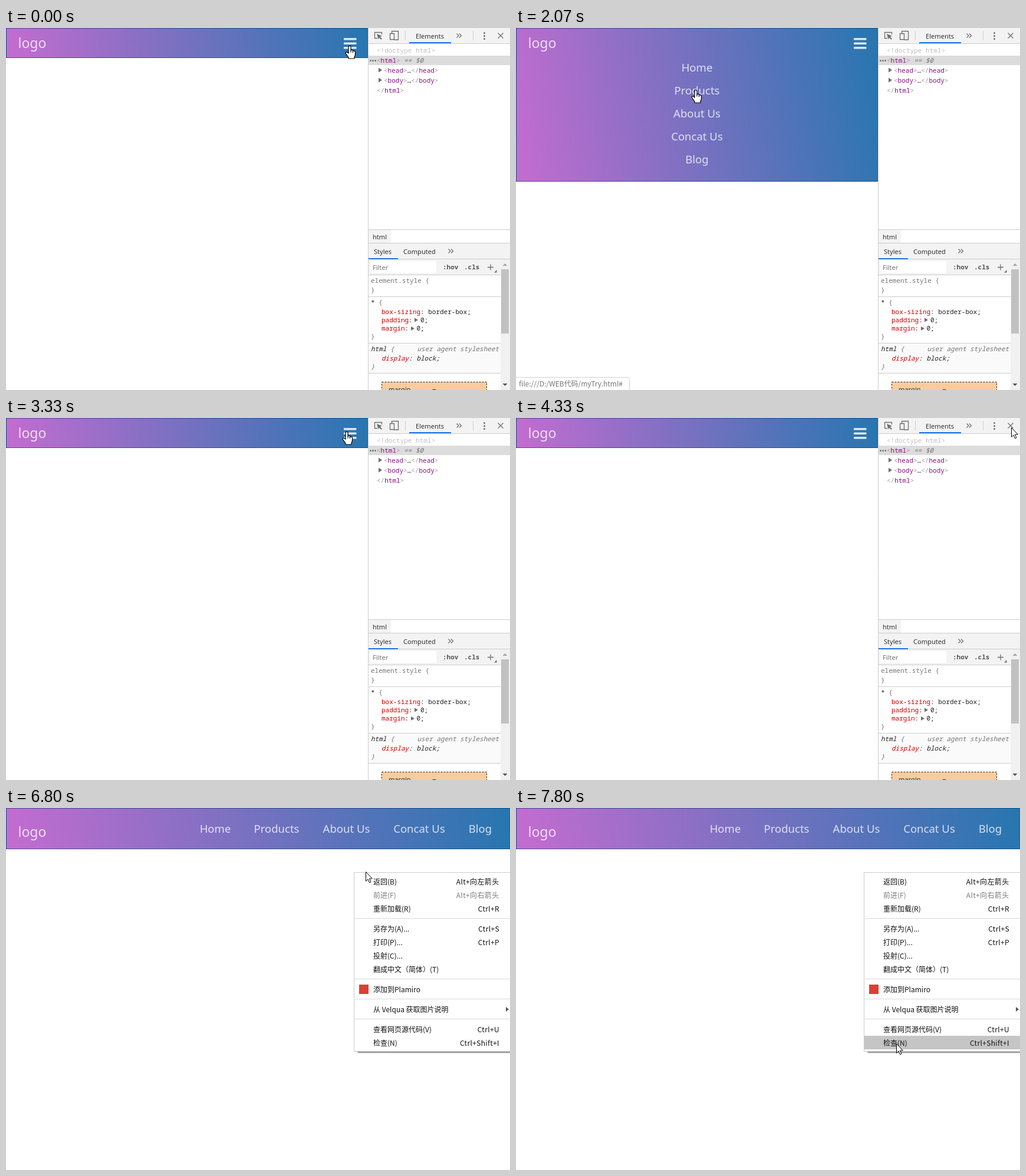
Animation, 855 px wide and 615 px high, one loop 8 s. Source, as an HTML page:

```html
<!DOCTYPE html>
<html lang="en">
<head>
<meta charset="utf-8">
<title>Responsive navbar</title>
<style>
html, body { margin: 0; width: 100%; height: 100%; overflow: hidden; background: #fff; }
svg { position: absolute; left: 0; top: 0; }

/* Every timeline shares one 8 s clock, divided into 120 ticks */
.anim { animation: 8s step-end -10ms infinite; }

#bar {
  position: absolute; left: 0; top: 0; box-sizing: border-box;
  border: 1px solid rgba(6, 52, 106, .6);
  background: linear-gradient(80deg, #c46cd0, #2676b0);
  animation-name: bar;
}
#narrow { animation-name: narrow; }
#links { animation-name: links; }
#wide { animation-name: wide; }
#tools { animation-name: tools; }
#status { animation-name: status; }
#menu { animation-name: menu; }
#hoverView { animation-name: hover-view; }
#hoverInspect { animation-name: hover-inspect; }
#hand { animation-name: hand; }
#arrow { animation-name: arrow; }
#pointer { animation: move 8s -10ms infinite; }

@keyframes bar {
  0% { width: 614px; height: 51px; }
  3.33% { width: 614px; height: 261px; }
  41.67% { width: 614px; height: 51px; }
  64.17%, 100% { width: 855px; height: 70px; }
}
@keyframes narrow { 0% { opacity: 1; } 64.17%, 100% { opacity: 0; } }
@keyframes links { 0% { opacity: 0; } 3.33% { opacity: 1; } 41.67%, 100% { opacity: 0; } }
@keyframes wide { 0% { opacity: 0; } 64.17%, 100% { opacity: 1; } }
@keyframes tools { 0% { opacity: 1; } 63.33%, 100% { opacity: 0; } }
@keyframes status {
  0% { opacity: 0; } 20.83% { opacity: .5; } 21.67% { opacity: 1; }
  32.5% { opacity: .5; } 33.33%, 100% { opacity: 0; }
}
@keyframes menu { 0% { opacity: 0; } 85%, 100% { opacity: 1; } }
@keyframes hover-view { 0% { opacity: 0; } 95% { opacity: 1; } 96.67%, 100% { opacity: 0; } }
@keyframes hover-inspect { 0% { opacity: 0; } 96.67%, 100% { opacity: 1; } }
@keyframes hand {
  0%, 14.17%, 19.17%, 36.67% { opacity: 1; }
  10.83%, 16.67%, 31.67%, 45.83%, 100% { opacity: 0; }
}
@keyframes arrow {
  0%, 14.17%, 19.17%, 36.67% { opacity: 0; }
  10.83%, 16.67%, 31.67%, 45.83%, 100% { opacity: 1; }
}
@keyframes move {
  0% { transform: translate(583px, 30px); }
  9.17% { transform: translate(583px, 30px); animation-timing-function: steps(3); }
  11.67% { transform: translate(552px, 33px); }
  12.5% { transform: translate(552px, 33px); animation-timing-function: steps(3); }
  15% { transform: translate(582px, 30px); }
  15.83% { transform: translate(582px, 30px); animation-timing-function: steps(2); }
  17.5% { transform: translate(440px, 48px); animation-timing-function: steps(2); }
  19.17% { transform: translate(291px, 70px); }
  22.5% { transform: translate(291px, 70px); animation-timing-function: steps(4); }
  25.83% { transform: translate(305px, 105px); }
  29.17% { transform: translate(305px, 105px); animation-timing-function: steps(3); }
  31.67% { transform: translate(350px, 92px); animation-timing-function: steps(4); }
  35% { transform: translate(556px, 30px); animation-timing-function: steps(2); }
  36.67% { transform: translate(578px, 23px); }
  45% { transform: translate(578px, 23px); animation-timing-function: steps(3); }
  47.5% { transform: translate(640px, 14px); animation-timing-function: steps(4); }
  50.83% { transform: translate(820px, 8px); animation-timing-function: steps(4); }
  54.17% { transform: translate(840px, 16px); }
  67.5% { transform: translate(840px, 16px); animation-timing-function: steps(2); }
  69.17% { transform: translate(836px, 15px); animation-timing-function: steps(6); }
  74.17% { transform: translate(650px, 92px); animation-timing-function: steps(4); }
  77.5% { transform: translate(610px, 108px); }
  85.83% { transform: translate(610px, 108px); animation-timing-function: steps(3); }
  88.33% { transform: translate(545px, 160px); animation-timing-function: steps(4); }
  91.67% { transform: translate(503px, 280px); animation-timing-function: steps(4); }
  95% { transform: translate(600px, 374px); animation-timing-function: steps(3); }
  97.5%, 100% { transform: translate(645px, 400px); }
}

text { white-space: pre; }
.nav { font: 18.55px "Noto Sans", sans-serif; fill: rgba(255, 255, 255, .78); }
.nav text { text-anchor: middle; }
.nav .logo { font-size: 23px; text-anchor: start; }
.ui { font: 11.1px "Noto Sans", sans-serif; fill: #333; }
.code { font: 11px "Noto Sans Mono", monospace; fill: #222; }
.it { font-style: italic; }
.b { font-weight: bold; fill: #555; }
.tag { fill: #881280; }
.br { fill: #a894a6; }
.prop { fill: #c80000; }
.dim { fill: #757575; }
.line { stroke: #ccc; fill: none; }
.icon { stroke: #6e6e6e; fill: none; stroke-width: 1.3; }
.tri { fill: #6e6e6e; }
.items { font: 12px "Noto Sans CJK SC", "Noto Sans", sans-serif; fill: #111; }
.keys { text-anchor: end; letter-spacing: .35px; }
</style>
</head>
<body>
<div id="bar" class="anim"></div>
<svg width="855" height="615" viewBox="0 0 855 615">
  <g id="narrow" class="anim nav">
    <text class="logo" x="20.5" y="34">logo</text>
    <g fill="#fff" fill-opacity=".84">
      <rect x="573" y="17" width="21.5" height="3.5" rx=".7"/>
      <rect x="573" y="24.5" width="21.5" height="3.5" rx=".7"/>
      <rect x="573" y="32" width="21.5" height="3.5" rx=".7"/>
    </g>
    <g id="links" class="anim">
      <text x="307" y="74">Home</text>
      <text x="307" y="113">Products</text>
      <text x="307" y="152">About Us</text>
      <text x="307" y="191">Concat Us</text>
      <text x="307" y="230">Blog</text>
    </g>
  </g>

  <g id="wide" class="anim nav">
    <text class="logo" x="20.5" y="49">logo</text>
    <text x="355" y="42">Home</text>
    <text x="459" y="42">Products</text>
    <text x="577.5" y="42">About Us</text>
    <text x="701" y="42">Concat Us</text>
    <text x="804.5" y="42">Blog</text>
  </g>

  <g id="tools" class="anim">
    <rect x="614" width="241" height="615" fill="#fff"/>
    <path fill="#f3f3f3" d="M615 0h240v26H615zM615 343h38v22H615zM615 366h240v53H615z"/>
    <rect x="615" y="47" width="240" height="16" fill="#dcdcdc"/>
    <rect x="615" y="536" width="224" height="50" fill="#fafafa"/>
    <rect x="618" y="396" width="112" height="20" fill="#fff"/>
    <path class="line" d="M614.5 0V615M615 26.5H855M677.5 5V21M792.5 5V21M615 342.5H855M615 365.5H855M615 392.5H855M615 419.5H839M615 456.5H839M615 535.5H839M615 586.5H839"/>
    <path fill="#1a73e8" d="M684 24h71v2h-71zM615 391h50v2h-50z"/>

    <path class="icon" d="M630 17.5H625.5V7.5H637.500V11M651.500 9V19.500H658M654.500 9V5.500H665.500V20H658.500V9.500H651"/>
    <path class="tri" d="M629 10l9 3.500-3.300 1.500 3.300 3.300-1.600 1.500-3.200-3.300-1.400 3z"/>
    <path class="icon" d="M764.500 9.500l3.500 3.500-3.500 3.500M769 9.500l3.500 3.500-3.500 3.500M750.500 375.500l3.500 3.500-3.500 3.500M755 375.500l3.500 3.500-3.500 3.500M834.500 8.500l9 9M843.500 8.500l-9 9M817 406.500h10M822 401.500v10"/>
    <g class="tri">
      <circle cx="811.500" cy="8.500" r="1.500"/><circle cx="811.500" cy="13.500" r="1.500"/><circle cx="811.500" cy="18.500" r="1.500"/>
      <path d="M828 415.500h4.500V411z"/>
      <path d="M632 67.500l6 4-6 4zM632 84.500l6 4-6 4z"/>
      <path d="M693 492.500l6 3.500-6 3.500zM687 507l6 3.500-6 3.500z"/>
    </g>
    <g fill="#555"><circle cx="618.500" cy="55.500" r="1.200"/><circle cx="622.500" cy="55.500" r="1.200"/><circle cx="626.500" cy="55.500" r="1.200"/></g>

    <g class="ui">
      <text x="695" y="18">Elements</text>
      <text x="622" y="359">html</text>
      <text x="624" y="384">Styles</text>
      <text x="674" y="384">Computed</text>
      <text class="dim" x="622" y="411">Filter</text>
    </g>

    <g class="code">
      <text x="629" y="42" fill="#c0c0c0">&lt;!doctype html&gt;</text>
      <text x="629" y="59" class="br">&lt;<tspan class="tag">html</tspan>&gt;<tspan class="it dim"> == $0</tspan></text>
      <text x="641" y="76" class="br">&lt;<tspan class="tag">head</tspan>&gt;<tspan fill="#222">…</tspan>&lt;/<tspan class="tag">head</tspan>&gt;</text>
      <text x="641" y="93" class="br">&lt;<tspan class="tag">body</tspan>&gt;<tspan fill="#222">…</tspan>&lt;/<tspan class="tag">body</tspan>&gt;</text>
      <text x="629" y="110" class="br">&lt;/<tspan class="tag">html</tspan>&gt;</text>

      <text class="b" x="741" y="410">:hov</text>
      <text class="b" x="777" y="410">.cls</text>

      <text class="dim" x="619" y="433">element.style {</text>
      <text class="dim" x="619" y="449">}</text>
      <text x="619" y="470">* <tspan class="dim">{</tspan></text>
      <text x="637" y="486"><tspan class="prop">box-sizing</tspan>: border-box;</text>
      <text x="637" y="500"><tspan class="prop">padding</tspan>:</text>
      <text x="703" y="500">0;</text>
      <text x="637" y="514"><tspan class="prop">margin</tspan>:</text>
      <text x="696.500" y="514">0;</text>
      <text class="dim" x="619" y="528">}</text>
      <g class="it">
        <text x="619" y="549">html <tspan class="dim">{</tspan></text>
        <text class="dim" x="697.500" y="549">user agent stylesheet</text>
        <text x="637" y="565"><tspan class="prop">display</tspan>: block;</text>
        <text class="dim" x="619" y="579">}</text>
      </g>
    </g>

    <rect x="637.500" y="601.500" width="178" height="30" fill="#f9cc9d" stroke="#222" stroke-dasharray="3 2"/>
    <text class="ui" x="649" y="618">margin</text>
    <path d="M723.500 614.500h6" stroke="#333"/>

    <rect x="839" y="393" width="16" height="222" fill="#f1f1f1"/>
    <rect x="840" y="410" width="13" height="109" fill="#c1c1c1"/>
    <path fill="#a3a3a3" d="M842.500 404h8l-4-4z"/>
    <path fill="#505050" d="M842.500 604h8l-4 4z"/>
  </g>

  <g id="status" class="anim">
    <path d="M-1 593.500H189q3.500 0 3.500 3.500V616H-1z" fill="#fff" stroke="#d0d0d0"/>
    <text class="items dim" x="5" y="609" style="fill:#757575">file:///D:/WEB代码/myTry.html#</text>
  </g>

  <g id="menu" class="anim">
    <path fill="#888" d="M596 414h259v1H596z"/>
    <path fill="#aaa" d="M597 415h258v1H597z"/>
    <path fill="#e0e0e0" d="M598 416h257v1H598z"/>
    <rect x="590.500" y="109.500" width="275" height="304" fill="#fff" stroke="#ccc"/>
    <rect id="hoverView" class="anim" x="591" y="364" width="264" height="23" fill="#c5c5c5"/>
    <rect id="hoverInspect" class="anim" x="591" y="387" width="264" height="23" fill="#c5c5c5"/>
    <path stroke="#d9d9d9" d="M592 187.500H855M592 290.500H855M592 324.500H855M592 358.500H855"/>
    <rect x="599" y="300" width="16" height="16" fill="#db4035"/>
    <path fill="#555" d="M848 338l5 4-5 4z"/>
    <g class="items">
      <text x="623" y="130">返回(B)</text>
      <text x="623" y="153" fill="#7c7c7c">前进(F)</text>
      <text x="623" y="176">重新加载(R)</text>
      <text x="623" y="210">另存为(A)...</text>
      <text x="623" y="233">打印(P)...</text>
      <text x="623" y="256">投射(C)...</text>
      <text x="623" y="279">翻成中文（简体）(T)</text>
      <text x="623" y="313">添加到Plamiro</text>
      <text x="623" y="347">从 Velqua 获取图片说明</text>
      <text x="623" y="381">查看网页源代码(V)</text>
      <text x="623" y="404">检查(N)</text>
      <g class="keys">
        <text x="836.500" y="130">Alt+向左箭头</text>
        <text x="836.500" y="153" fill="#7c7c7c">Alt+向右箭头</text>
        <text x="837" y="176">Ctrl+R</text>
        <text x="837" y="210">Ctrl+S</text>
        <text x="837" y="233">Ctrl+P</text>
        <text x="837" y="381">Ctrl+U</text>
        <text x="837" y="404">Ctrl+Shift+I</text>
      </g>
    </g>
  </g>

  <g id="pointer" fill="#fff" stroke="#000" stroke-linejoin="round">
    <g id="hand" class="anim" stroke-width="1.200">
      <path d="M-2 13V2Q-2 .3 0 .3Q2 .3 2 2V8Q2.500 7 4 7.200Q5.500 7.400 5.500 9Q6.200 8.200 7.300 8.600Q9.600 9.300 9.500 11V15Q9.500 17 8 19V22H-2V20Q-3 18-6.300 13.800Q-7.300 12.200-6.100 11.200Q-4.600 10.300-2 13z"/>
      <path fill="none" d="M2 8v3.500M5.500 9v3"/>
    </g>
    <path id="arrow" class="anim" d="M.5 .5V16.300L4 13L6.600 18.800L9 17.700L6.500 12H11.300z"/>
  </g>
</svg>
</body>
</html>
```
